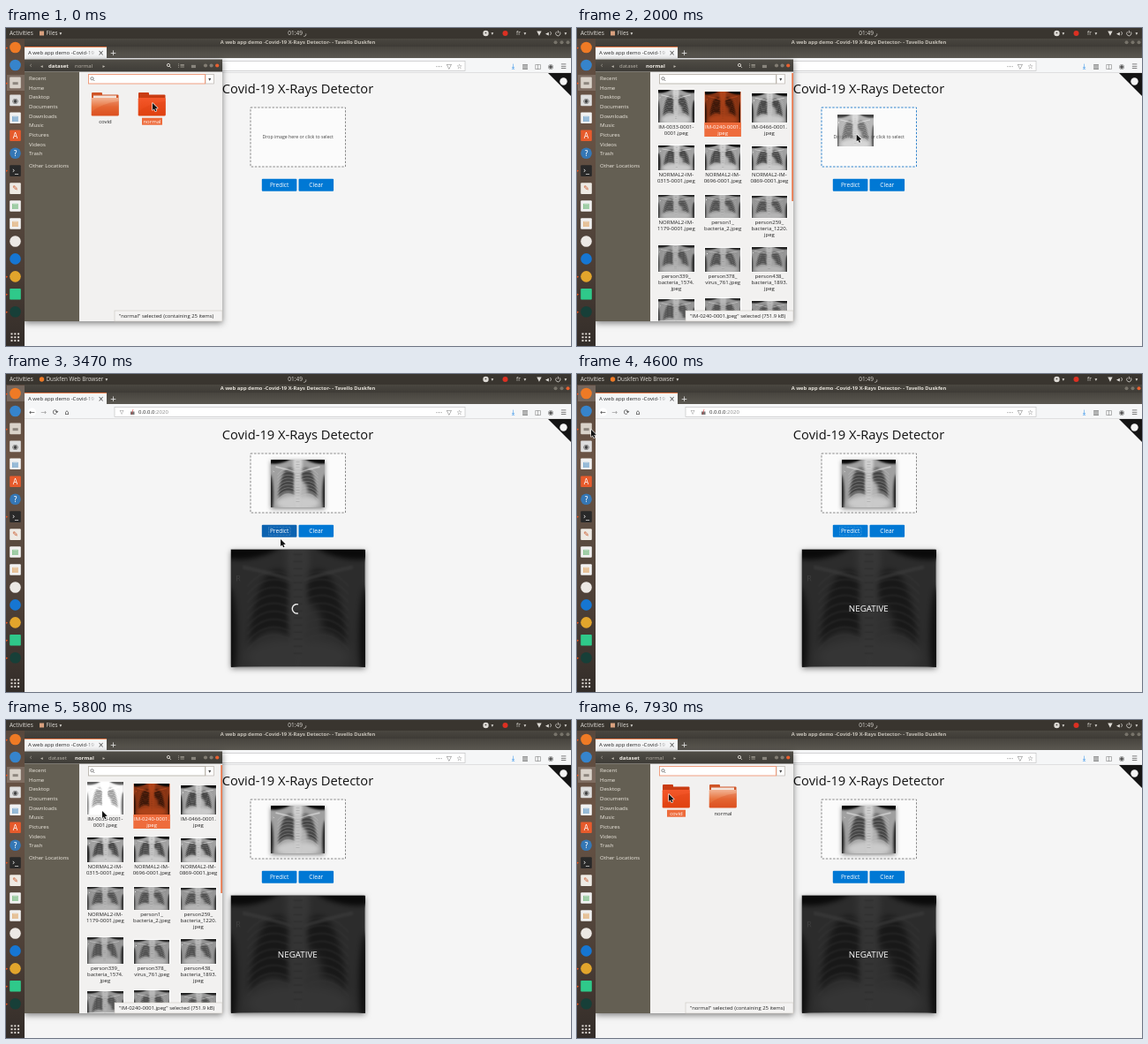
Recreate the animation shown at these times as an HTML page with a canvas. Size 640 px wide and 360 px high, loop 8 s.

```html
<!DOCTYPE html>
<html lang="en">
<head>
<meta charset="utf-8">
<title>X-Ray detector demo</title>
<style>
  html, body { margin: 0; width: 100%; height: 100%; overflow: hidden; background: #f5f5f5; }
  canvas { display: block; width: 640px; height: 360px; }
</style>
</head>
<body>
<canvas id="stage"></canvas>
<script>
const LOOP = 8000;
const UI = '"Open Sans", "Noto Sans", sans-serif';
const SYMBOLS = '"DejaVu Sans", sans-serif';
const ORANGE = '#ee6c3c';
const stage = document.getElementById('stage');
const ratio = window.devicePixelRatio || 1;
stage.width = 640 * ratio;
stage.height = 360 * ratio;
const ctx = stage.getContext('2d');

// Moments at which the scene switches, in ms
const OPEN = 350, SELECT = 1420, DRAG = 1540, DROP = 2130, RAISE = 2870,
      LOAD = 2950, RESULT = 3950, FILES = 4900, BACK = 7130, PICK = 7900;

// Pointer gestures; it rests between them
const home = { x: 166, y: 85 };
const moves = [
  { from: 400, to: 800, x: 349, y: 122 },
  { from: 950, to: 1400, x: 170, y: 94 },
  { from: 1520, to: 2080, x: 325, y: 122 },
  { from: 2150, to: 2750, x: 311, y: 178 },
  { from: 3300, to: 3470, x: 311, y: 187 },
  { from: 3620, to: 4250, x: 16, y: 63 },
  { from: 5150, to: 5760, x: 109, y: 103 },
  { from: 6130, to: 6900, x: 58, y: 41 },
  { from: 7220, to: 7760, x: 104, y: 84 }
];

const fileNames = [
  'IM-0033-0001-|0001.jpeg', 'IM-0240-0001.|jpeg', 'IM-0466-0001.|jpeg',
  'NORMAL2-IM-|0315-0001.jpeg', 'NORMAL2-IM-|0696-0001.jpeg', 'NORMAL2-IM-|0869-0001.jpeg',
  'NORMAL2-IM-|1179-0001.jpeg', 'person1_|bacteria_2.jpeg', 'person259_|bacteria_1220.|jpeg',
  'person339_|bacteria_1574.|jpeg', 'person378_|virus_761.jpeg', 'person438_|bacteria_1893.|jpeg',
  '', '', ''
];
const places = ['Recent', 'Home', 'Desktop', 'Documents', 'Downloads', 'Music', 'Pictures', 'Videos', 'Trash'];

const dockApps = [
  { color: '#ef7a25', round: true, running: true },
  { color: '#3684cc', round: true },
  { color: '#d9d2c9', glyph: '▬', ink: '#8d867e', running: true },
  { color: '#dedede', glyph: '◉', ink: '#444' },
  { color: '#f1f1f1', glyph: '▤', ink: '#2c79b8' },
  { color: '#e75b2c', glyph: 'A', ink: '#fff' },
  { color: '#3577b5', glyph: '?', ink: '#fff', round: true },
  { color: '#292929', glyph: '›_', ink: '#fff', running: true },
  { color: '#eeeae4', glyph: '✎', ink: '#c9592b' },
  { color: '#f1f1f1', glyph: '▤', ink: '#3ea34b' },
  { color: '#f1f1f1', glyph: '▤', ink: '#d98a31' },
  { color: '#ece8e4', round: true },
  { color: '#1676d2', round: true },
  { color: '#e2a52c', round: true, running: true },
  { color: '#2fc98a', running: true },
  { color: '#173f38', round: true, running: true }
];

const random = seed => {
  const v = Math.sin(seed * 127.1) * 43758.5453;
  return v - Math.floor(v);
};

function rect(x, y, w, h, fill) {
  ctx.fillStyle = fill;
  ctx.fillRect(x, y, w, h);
}

function frame(x, y, w, h, color, width = 0.7, dash = []) {
  ctx.strokeStyle = color;
  ctx.lineWidth = width;
  ctx.setLineDash(dash);
  ctx.strokeRect(x, y, w, h);
  ctx.setLineDash([]);
}

function rounded(x, y, w, h, r, fill) {
  ctx.fillStyle = fill;
  ctx.beginPath();
  ctx.roundRect(x, y, w, h, r);
  ctx.fill();
}

function circle(x, y, r, fill) {
  ctx.fillStyle = fill;
  ctx.beginPath();
  ctx.arc(x, y, r, 0, 7);
  ctx.fill();
}

function arc(x, y, r, start, end, color, width) {
  ctx.strokeStyle = color;
  ctx.lineWidth = width;
  ctx.beginPath();
  ctx.arc(x, y, r, start, end);
  ctx.stroke();
}

// Writes a line centred on y and returns its width
function text(str, x, y, size, color, { weight = 400, align = 'left', family = UI } = {}) {
  ctx.font = `${weight} ${size}px ${family}`;
  ctx.fillStyle = color;
  ctx.textAlign = align;
  ctx.fillText(str, x, y + size * 0.35);
  return ctx.measureText(str).width;
}

const centered = (str, x, y, size, color, weight) => text(str, x, y, size, color, { weight, align: 'center' });
const symbol = (str, x, y, size, color) => text(str, x, y, size, color, { align: 'center', family: SYMBOLS });

function vertical(y1, y2, ...colors) {
  const g = ctx.createLinearGradient(0, y1, 0, y2);
  colors.forEach((c, i) => g.addColorStop(i / (colors.length - 1), c));
  return g;
}

function shadowed(blur, draw) {
  ctx.save();
  ctx.shadowColor = 'rgba(0,0,0,.5)';
  ctx.shadowBlur = blur * ratio;
  ctx.shadowOffsetY = 1.5 * ratio;
  draw();
  ctx.restore();
}

function blended(mode, draw) {
  ctx.globalCompositeOperation = mode;
  draw();
  ctx.globalCompositeOperation = 'source-over';
}

function magnifier(x, y, color) {
  arc(x, y, 1.6, 0, 7, color, 0.8);
  ctx.beginPath();
  ctx.moveTo(x + 1.2, y + 1.2);
  ctx.lineTo(x + 2.8, y + 2.8);
  ctx.stroke();
}

// A chest picture in a 151 x 133 space, built from mirrored halves
function makeXray(seed, haze) {
  const canvas = document.createElement('canvas');
  canvas.width = 302;
  canvas.height = 266;
  const c = canvas.getContext('2d');
  const lung = new Path2D('M11 36C16 14 36 20 45 50S55 96 54 108Q34 82 10 98Z');
  const blob = (x, y, rx, ry, fill, blur, tilt = 0) => {
    c.filter = `blur(${blur}px)`;
    c.fillStyle = fill;
    c.beginPath();
    c.ellipse(x, y, rx, ry, tilt, 0, 7);
    c.fill();
  };
  c.scale(2, 2);
  c.translate(75.5 + (random(seed) - 0.5) * 6 * (seed > 0), 0);
  c.fillStyle = '#a0a0a0';
  c.fillRect(-90, 0, 180, 133);
  blob(0, 122, 60, 22, '#cacaca', 12);
  for (const side of [1, -1]) {
    c.save();
    c.scale(side, 1);
    blob(52, -3, 36, 13, '#050505', 6, 0.2);
    blob(78, 100, 9, 58, '#1e1e1e', 7);
    c.filter = 'blur(7px)';
    c.fillStyle = '#464646';
    c.fill(lung);
    c.filter = 'blur(1.5px)';
    c.strokeStyle = 'rgba(215,215,215,.33)';
    c.lineWidth = 2;
    c.beginPath();
    for (let y = 30; y < 110; y += 9) {
      c.moveTo(8, y);
      c.quadraticCurveTo(36, y - 14, 57, y + 12);
    }
    c.stroke();
    c.filter = 'blur(2px)';
    c.strokeStyle = 'rgba(225,225,225,.7)';
    c.lineWidth = 4;
    c.beginPath();
    c.moveTo(6, 35);
    c.quadraticCurveTo(26, 28, 62, 20);
    c.stroke();
    c.restore();
  }
  blob(0, 10, 13, 24, '#d6d6d6', 8);
  blob(0, 65, 9, 80, 'rgba(205,205,205,.85)', 6);
  blob(10, 80, 16, 24, 'rgba(196,196,196,.85)', 9, -0.4);
  c.filter = 'blur(1px)';
  c.fillStyle = 'rgba(70,70,70,.22)';
  for (let y = 5; y < 125; y += 8) c.fillRect(-5, y, 10, 1.5);
  c.filter = 'none';
  c.fillStyle = `rgba(115,115,115,${haze})`;
  c.fillRect(-90, 0, 180, 133);
  c.font = `9px ${UI}`;
  c.fillStyle = 'rgba(245,245,245,.85)';
  c.fillText('R', -70, 36);
  return canvas;
}

const chest = makeXray(0, 0);

// Grid of three columns; a row is as tall as its longest label needs
const thumbs = [];
for (let i = 0, bottom = 107; i < fileNames.length; i += 3) {
  const row = fileNames.slice(i, i + 3).map(name => name.split('|'));
  row.forEach((label, col) => {
    const h = i ? 25 + 7 * random(i + col + 2) : 37 - 2 * col;
    const image = i + col === 1 ? chest : makeXray(i + col + 1, i < 6 ? 0 : 0.25);
    thumbs.push({ label, image, h, bottom, cx: 112.3 + col * 52.8 });
  });
  bottom += 40 + 7 * Math.max(...row.map(label => label.length));
}

function pointerAt(t) {
  let { x, y } = home;
  for (const m of moves) {
    const u = Math.min(1, Math.max(0, (t - m.from) / (m.to - m.from)));
    const e = u * u * (3 - 2 * u);
    x += (m.x - x) * e;
    y += (m.y - y) * e;
  }
  return { x, y };
}

const inside = (p, x, y, w, h) => p.x >= x && p.x <= x + w && p.y >= y && p.y <= y + h;
const inZone = p => inside(p, 277, 90, 107, 68);

function drawPanel(filesOnTop) {
  const light = '#dedbd6';
  rect(0, 0, 640, 12, '#39352f');
  text('Activities', 4, 6, 6.5, light);
  if (filesOnTop) rect(38, 3.5, 5, 5, '#d8a07e');
  else circle(40.5, 6, 2.7, '#ee7a27');
  const width = text(filesOnTop ? 'Files' : 'Duskfen Web Browser', 45.5, 6, 6.3, light);
  symbol('▾', 49 + width, 6, 5.5, light);
  centered('01:49 ر', 330, 6, 6.5, light);
  circle(543.5, 6, 3.2, light);
  symbol('✶', 543.5, 6, 4, '#39352f');
  circle(565.5, 6, 3, '#dc3022');
  text('fr', 578, 6, 6.5, light);
  for (const x of [551, 588, 634]) symbol('▾', x, 6, 5.5, light);
  symbol('▼', 604, 6, 7, light);
  symbol('◀', 613, 6, 5, light);
  arc(615, 6, 2.4, -1, 1, light, 0.8);
  arc(625.3, 6.2, 2.6, -0.9, 4.04, light, 0.8);
  rect(624.9, 2.8, 0.8, 3, light);
}

function drawDock(filesOnTop) {
  rect(0, 12, 21, 348, vertical(12, 360, '#58483d', '#6b5445', '#5a4b40', '#4a3d35', '#332d29'));
  rect(1, filesOnTop ? 53 : 13, 20, 18, 'rgba(255,255,255,.16)');
  dockApps.forEach((app, i) => {
    const y = 22 + i * 19.95;
    rounded(4.2, y - 6.3, 12.6, 12.6, app.round ? 6.3 : 1, app.color);
    if (app.glyph) symbol(app.glyph, 10.5, y, 8, app.ink);
    if (app.running) symbol('▸', 1, y, 5, '#e95420');
  });
  for (let i = 0; i < 9; i++) rect(5.5 + (i % 3) * 3.8, 345.3 + Math.floor(i / 3) * 3.8, 2, 2, '#ddd8d2');
}

function drawBrowser(focused) {
  rect(21, 12, 619, 9, vertical(12, 21, '#4a4740', '#3e3b36'));
  centered('A web app demo -Covid-19 X-Rays Detector- - Tavello Duskfen', 330.5, 16.3, 5.8,
    focused ? '#e6e2da' : '#c6c1b8', 700);
  for (let i = 0; i < 3; i++) circle(622.5 + i * 7, 16.2, 2, focused && i === 2 ? '#e9602f' : '#77736a');
  rect(21, 21, 619, 13, vertical(21, 34, '#47443e', '#5b5851'));
  rect(21, 21, 93, 13, '#f5f6f7');
  rect(21, 21, 93, 1, '#ef7b48');
  const fade = ctx.createLinearGradient(88, 0, 103, 0);
  fade.addColorStop(0, '#222');
  fade.addColorStop(1, 'rgba(34,34,34,.05)');
  text('A web app demo -Covid-19 ', 25, 28, 6, fade);
  symbol('×', 107.5, 28, 8, '#444');
  symbol('+', 121.5, 28, 9, '#eee');

  rect(21, 34, 619, 17, '#f5f6f7');
  rect(21, 50.5, 619, 0.7, '#c9c9c9');
  circle(29.5, 43, 4.6, '#fff');
  ['←', '→', '⟳', '⌂'].forEach((icon, i) => symbol(icon, 29.5 + i * 13.3, 43, 8, i === 1 ? '#999' : '#444'));
  rect(123, 37.5, 397, 11, '#fff');
  frame(123, 37.5, 397, 11, '#c4c4c4');
  symbol('▽', 131, 43, 6, '#666');
  rect(141, 42.5, 4.5, 3.5, '#777');
  symbol('∕', 143.2, 43, 7, '#d33');
  const hostWidth = text('0.0.0.0', 150, 43, 6, '#222');
  text(':2020', 150 + hostWidth, 43, 6, '#888');
  ['⋯', '▽', '☆'].forEach((icon, i) => symbol(icon, 490.5 + i * 11.5, 43, 7.5, '#555'));
  symbol('⤓', 574.5, 43, 8, '#1583e8');
  ['▥', '◫', '◉', '☰'].forEach((icon, i) => symbol(icon, 588 + i * 14.5, 43, 7.5, '#555'));

  rect(21, 51, 619, 309, '#f5f5f5');
  ctx.fillStyle = '#141414';
  ctx.fill(new Path2D('M614 51h26v26z'));
  circle(631.5, 60.5, 4.2, '#f5f5f5');
  centered('Covid-19 X-Rays Detector', 330.5, 69, 14.7, '#111');
}

function drawButton(label, x, hovered) {
  rounded(x, 170.7, 39.6, 14, 1, hovered ? '#0b62b0' : '#0078d4');
  centered(label, x + 19.8, 177.7, 6.6, '#fff');
}

function drawDetector(t, pointer, filesOnTop) {
  rect(277, 90, 107.5, 67, '#fbfbfb');
  frame(277, 90, 107.5, 67, t > DRAG && inZone(pointer) ? '#1976c8' : '#7b7b7b', 0.9, [2.4, 1.7]);
  drawButton('Predict', 289.8, t > 2700 && t < 3560);
  drawButton('Clear', 331.5, false);
  if (t > LOAD && !filesOnTop) frame(297.5, 173.3, 24.5, 9, 'rgba(255,255,255,.55)', 0.5, [0.7, 0.7]);
  if (t < DROP + 60) {
    centered('Drop image here or click to select', 330.7, 123.5, 5.2, '#444');
    return;
  }
  shadowed(5, () => ctx.drawImage(chest, 300, 97, 61, 53.5));
  shadowed(6, () => ctx.drawImage(chest, 254.7, 198.5, 151.8, 133));
  if (t < LOAD) return;
  rect(254.7, 198.5, 151.8, 133, 'rgba(12,12,12,.78)');
  if (t >= RESULT) {
    centered('NEGATIVE', 330.3, 265.8, 9.8, '#fff');
  } else {
    const turn = (t - 3470) / 1000 * Math.PI * 2;
    arc(329.5, 265.8, 5.2, turn + 1.3, turn + 5, '#eee', 1.4);
  }
}

function drawFolder(name, cx, selected) {
  const x = cx - 15.5;
  const back = selected ? '#c93c12' : '#cf5527';
  rounded(x, 73, 12, 10, 1, back);
  rounded(x, 75.5, 30.5, 23, 1, back);
  if (!selected) rect(x + 2, 76.5, 26, 10, '#f3e5dc');
  rounded(x - 0.3, 79, 31, 20.5, 1.2, selected
    ? vertical(79, 100, '#f4572a', '#e2420f')
    : vertical(79, 100, '#f2b394', '#e8743f', '#dd5423'));
  ctx.fillStyle = 'rgba(215,60,15,.25)';
  ctx.fill(new Path2D(`M${x} 99V95Q${x + 12} 85 ${x + 30.5} 83V99Z`));
  if (selected) rect(cx - 11.5 + (name.length < 6), 101.7, 23 - 2 * (name.length < 6), 8, ORANGE);
  centered(name, cx, 105.7, 6, selected ? '#fff' : '#222');
}

function drawThumb({ label, image, h, bottom, cx }, selected, pointer) {
  const x = cx - 20.5, top = bottom - h;
  rect(x - 0.4, top - 0.4, 41.8, h + 0.8, '#fff');
  ctx.drawImage(image, x + 0.3, top + 0.3, 40.4, h - 0.6);
  if (selected) {
    rect(x - 0.3, bottom, 41.6, 16, ORANGE);
    blended('multiply', () => rect(x, top, 41, h, '#d9531f'));
  } else if (inside(pointer, x, top, 41, h + 14)) {
    blended('lighter', () => rect(x, top, 41, h, '#5a5a5a'));
  }
  label.forEach((line, n) => centered(line, cx, bottom + 5 + n * 7, 6, selected ? '#fff' : '#222'));
}

function drawFiles(t, pointer) {
  const listing = t >= OPEN && t < BACK;
  const bright = '#f3efe8', dim = '#bdb8ae';
  shadowed(7, () => rect(21, 35.5, 224, 296.5, '#f2f1f0'));
  rect(21, 35.5, 224, 14, vertical(35, 50, '#514e47', '#3d3b36'));
  rect(21, 49.5, 62, 282.5, '#645f53');
  symbol('‹', 28, 42.5, 8, '#9a958b');
  symbol('◂', 40.5, 42.7, 5.5, dim);
  text('dataset', 48, 42.7, 6, listing ? dim : bright, { weight: listing ? 400 : 700 });
  text('normal', 78, 42.7, 6, listing ? bright : dim, { weight: listing ? 700 : 400 });
  symbol('▸', 111, 42.7, 5.5, dim);
  magnifier(184, 42, bright);
  symbol('⁝≡', 198.5, 42.7, 7, dim);
  symbol('≡', 212.3, 42.7, 8, dim);
  for (let i = 0; i < 3; i++) circle(226 + i * 6.6, 42.5, 2.1, i === 2 ? '#e9602f' : '#827d73');

  places.forEach((place, i) => text(place, 26, 57 + i * 10.65, 6.1, '#efeae1'));
  text('Other Locations', 26, 155.8, 6.1, '#efeae1');

  if (listing) {
    ctx.save();
    ctx.beginPath();
    ctx.rect(83, 64, 162, 267.5);
    ctx.clip();
    thumbs.forEach((thumb, i) => drawThumb(thumb, i === 1 && t > SELECT, pointer));
    ctx.restore();
    rect(243.3, 51, 1.7, 145, '#e9764a');
  } else {
    drawFolder('covid', 112.5, t >= PICK);
    drawFolder('normal', 165.5, t < PICK);
  }
  rect(93.5, 52.5, 142, 10.5, '#fff');
  frame(226, 52.5, 9.5, 10.5, '#b9b3ab');
  frame(93.5, 52.5, 132, 10.5, listing ? '#b9b3ab' : '#ef9573', 0.9);
  symbol('▾', 230.8, 58, 6, '#444');
  magnifier(97.5, 57.2, '#666');

  if (!listing || t > SELECT + 80) {
    rect(123, 320, 122, 12, '#f4f3f2');
    frame(123, 320, 122, 12, '#c9c5bf', 0.6);
    text(listing ? '"IM-0240-0001.jpeg" selected (751.9 kB)' : '"normal" selected (containing 25 items)',
      128, 325.8, 5.9, '#222');
  }
}

const arrow = new Path2D('M0 0V8L1.8 6.4 3.1 9.3 4.5 8.7 3.2 5.9 5.8 5.7Z');
const hand = new Path2D('M0 0h1.4v3l3.8 1v2.5L4.2 8H0L-2.2 5l1-.8L0 5Z');

function drawPointer({ x, y }, pressing) {
  ctx.save();
  ctx.translate(x, y);
  ctx.lineJoin = 'round';
  ctx.fillStyle = pressing ? '#fff' : '#111';
  ctx.strokeStyle = pressing ? '#111' : '#fff';
  ctx.lineWidth = 1.2;
  const shape = pressing ? hand : arrow;
  ctx.stroke(shape);
  ctx.fill(shape);
  ctx.restore();
}

function render() {
  const t = performance.now() % LOOP;
  const pointer = pointerAt(t);
  const filesOnTop = t < RAISE || t >= FILES;
  ctx.setTransform(ratio, 0, 0, ratio, 0, 0);
  drawBrowser(!filesOnTop);
  drawDetector(t, pointer, filesOnTop);
  if (filesOnTop) drawFiles(t, pointer);
  drawDock(filesOnTop);
  drawPanel(filesOnTop);
  if (t > DRAG && t < DROP) {
    ctx.globalAlpha = 0.75;
    ctx.drawImage(chest, pointer.x - 22, pointer.y - 22, 41, 36);
    ctx.globalAlpha = 1;
  }
  drawPointer(pointer, t > DROP && inZone(pointer));
  requestAnimationFrame(render);
}
render();
</script>
</body>
</html>
```
